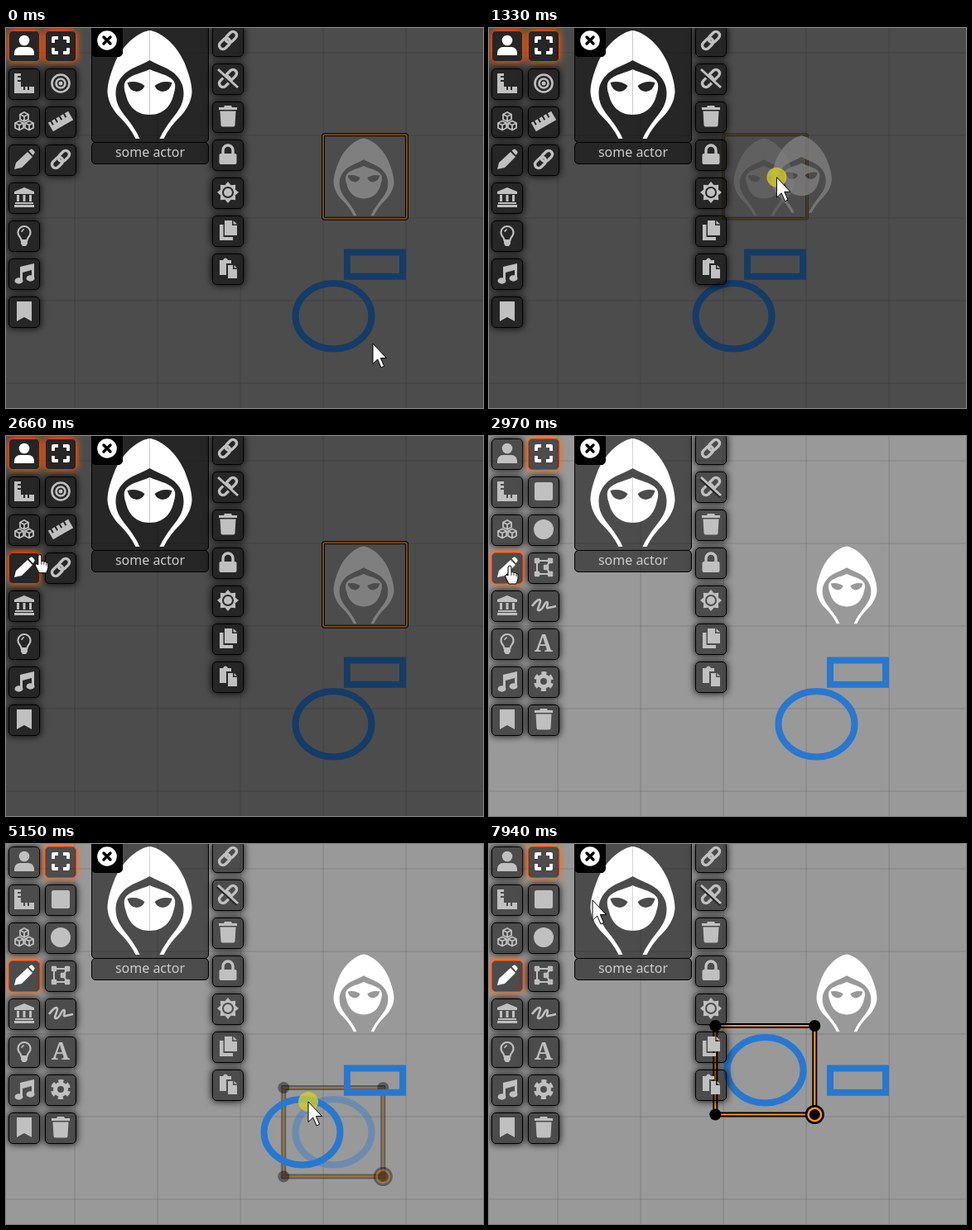
Recreate the animation shown at these times as an HTML page with a canvas. Size 576 px wide and 460 px high, loop 8000 ms.

```html
<!DOCTYPE html>
<html lang="en">
<head>
<meta charset="utf-8">
<title>Moving linked drawings</title>
<style>
  html, body { margin: 0; width: 576px; height: 460px; overflow: hidden; }
  body { position: relative; background: #999; }
  canvas, #pointer { position: absolute; left: 0; top: 0; }
  .box {
    position: absolute; box-sizing: border-box; border: 1px solid #000; border-radius: 5px;
    background: rgba(0, 0, 0, .5); color: #c0c0c0;
  }
  .tool { width: 38px; height: 38px; box-shadow: 0 0 10px #000; }
  .tool svg { display: block; fill: currentColor; fill-rule: evenodd; }
  .line { fill: none; stroke: currentColor; stroke-linejoin: round; }
  .on, .hover { color: #fff; border-color: #ff3000; box-shadow: 0 0 10px #ff6400; }
  #portrait { left: 103px; top: -8px; width: 142px; height: 147px; }
  #portrait svg { position: absolute; left: 0; top: 8px; fill: #fff; fill-rule: evenodd; }
  #name {
    left: 103px; top: 138px; width: 142px; height: 27px; color: #ccc;
    font: 500 16px/23px "Noto Sans", sans-serif; text-align: center;
  }
  #close { left: 103px; top: -3px; background: #000; color: #fff; box-shadow: none; }
</style>
</head>
<body>
<canvas id="scene" width="576" height="460"></canvas>
<div id="ui"></div>
<svg id="pointer" width="576" height="460">
  <g id="spot">
    <circle id="press" r="12" fill="#d8d028" fill-opacity=".76"/>
    <path id="arrow" d="M0 0V24.5L5.7 19 10 29 13.6 27.3 9.4 17.6H16.5Z" fill="#fff" stroke="#000"/>
    <g id="hand" fill="#fff" stroke="#000">
      <path d="M-2 12V2Q-2 0 0 0T2 2V8Q3.5 7 5 8.5 7 8 8 9.5 10 9 10 11V16L8 22H-1L-5 14Q-6 11-4 11Z"/>
      <path d="M2 8v4M5 9v3M8 10v3" fill="none" stroke-width=".8"/>
    </g>
  </g>
</svg>
<script>
const LOOP = 8000, SWITCH = 2890;
const $ = id => document.getElementById(id);
const ctx = $('scene').getContext('2d');

// Right half of the hooded figure, mirrored for the left
const HOOD = 'M0 0C11 1 31 14 42 39C47 52 51 63 51 75C50 88 43 98 36 105C28 113 22 121 17 131H12' +
  'C16 122 21 115 27 107C36 96 41 88 41 76C41 66 37 59 30 52C20 44 8 41 0 36Z' +
  'M0 47C8 51 21 53 28 60C32 64 31 71 29 77C26 91 17 102 0 102Z' +
  'M6 67Q15 60 27 63Q25 73 16 74Q9 74 6 67Z';
const hood = new Path2D(HOOD);
hood.addPath(new Path2D(HOOD), new DOMMatrix([-1, 0, 0, 1, 0, 0]));

const line = (d, w) => `<path class="line" stroke-width="${w}" d="${d}"/>`;
const fill = d => `<path d="${d}"/>`;
const disc = (r, x = 0, y = 0) => `<circle r="${r}" cx="${x}" cy="${y}"/>`;
const ring = (r, w, more = '') => `<circle class="line" r="${r}" stroke-width="${w}" ${more}/>`;
const cube = (x, y) => line(`M${x} ${y - 6}l5 2.5v6l-5 2.5-5-2.5v-6zM${x - 5} ${y - 3.5}l5 2.5 5-2.5M${x} ${y - 1}v6`, 1.8);
const star = 'M' + Array.from({ length: 16 }, (_, i) => {
  const r = i % 2 ? 9.5 : 13, a = i * Math.PI / 8;
  return (r * Math.cos(a)).toFixed(1) + ' ' + (r * Math.sin(a)).toFixed(1);
}).join('L') + 'Z';
const chain = `<g class="line" stroke-width="3.4" transform="rotate(-45)">
  <rect x="-13" y="-4.5" width="15" height="9" rx="4.5"/><rect x="-2" y="-4.5" width="15" height="9" rx="4.5"/></g>`;

const icons = {
  user: disc(6.3, 0, -6) + fill('M-12 12v-3a7 7 0 0 1 7-7h10a7 7 0 0 1 7 7v3z'),
  measure: fill('M-12-12h8v3h-4v2h4v3h-4v2h4v6h3v4h2v-4h3v4h2v-4h6v8h-24z'),
  cubes: cube(0, -5) + cube(-6, 5.5) + cube(6, 5.5),
  pencil: fill('M-12 12l2-8L4-9l6 6-13 13zM5.5-10.5l2-1.5q1.5-1 3 .5l1.5 1.5q1.5 1.5 0 3l-1.5 2z'),
  bank: fill('M0-12L12-7v3H-12v-3zM-9-3h3v8h-3zM-1.5-3h3v8h-3zM6-3h3v8h-3zM-11 6h22v2h-22zM-12 9h24v3h-24z'),
  bulb: line('M-3.5 6Q-4 3-6 1A7.5 7.5 0 1 1 6 1Q4 3 3.5 6Z', 2.2) + line('M-3-4q.5-3 3-3', 1.5) + fill('M-4 7h8v3l-2 3h-4l-2-3z'),
  music: fill('M-5-8L12-12V6h-3V-4L-2-1V9h-3z') +
    '<ellipse cx="-6.5" cy="9" rx="5" ry="3.7"/><ellipse cx="7.5" cy="6" rx="5" ry="3.7"/>',
  bookmark: fill('M-9-12h18v24l-9-5-9 5z'),
  expand: line('M-9-3V-9H-3M3-9H9V-3M9 3V9H3M-3 9H-9V3', 3.8),
  target: ring(10.5, 2.6) + ring(5.5, 2.6) + disc(2.5),
  ruler: '<g transform="rotate(-30)">' + fill('M-14-6h3v5h2v-5h4v5h2v-5h4v5h2v-5h4v5h2v-5h5v12h-28z') + '</g>',
  link: chain,
  square: '<rect x="-11" y="-11" width="22" height="22" rx="2.5"/>',
  circle: disc(12),
  polygon: line('M-8-8H8L3 0 8 8H-8Z', 2) +
    '<g class="line" stroke-width="2.4">' + [[-8, -8], [8, -8], [8, 8], [-8, 8], [3, 0]].map(([x, y]) =>
      `<rect x="${x - 2}" y="${y - 2}" width="4" height="4"/>`).join('') + '</g>',
  wave: line('M-14 1C-8-7-4-9-4-5S-10 7-5 6 1-5 4-4 1 5 6 3L15 1', 2.6),
  letter: '<text y="10" text-anchor="middle" font-family="Noto Serif, serif" font-weight="bold" font-size="29">A</text>',
  gear: ring(6.5, 5) + ring(10, 4, 'stroke-dasharray="6 4.472" transform="rotate(13)"'),
  trash: fill('M-11-11h6l1-2h8l1 2h6v3h-22zM-9.5-6.5h19l-1 17q0 2-2 2h-13q-2 0-2-2z'),
  unlink: chain + '<path d="M-13-9L11 13" stroke="#262626" stroke-width="3"/>' + line('M-12-11L12 11', 3),
  lock: line('M-6 0v-5a6 6 0 0 1 12 0v5', 3.4) + '<rect x="-10.5" y="-1" width="21" height="13" rx="2"/>',
  sun: fill(star + 'M-7 0a7 7 0 1 0 14 0a7 7 0 1 0-14 0') + disc(5),
  copy: fill('M-4-12h9v6h6v12h-15zM6.5-12l4.5 4.5h-4.5zM-10-7h4.5v15H6v4h-16z'),
  paste: fill('M-10-10h4q1-2.5 3-2.5t3 2.5h4v4h-6v14h-8zM0-4h6v5h5v11h-11zM7.5-4l3.5 3.5h-3.5z'),
  close: disc(11.8) + '<path d="M-4-4L4 4M4-4L-4 4" stroke="#000" stroke-width="3.4" stroke-linecap="round"/>'
};
const svg = name => `<svg width="36" height="36" viewBox="-18 -17 36 36">${icons[name]}</svg>`;

const tools = [];
function column(x, y, names, phase) {
  names.split(' ').forEach((name, i) => {
    const el = document.createElement('div');
    el.className = 'box tool';
    el.style.left = x + 'px';
    el.style.top = y + i * 46 + 'px';
    el.innerHTML = svg(name);
    $('ui').append(el);
    tools.push({ el, name, phase, x, y: y + i * 46 });
  });
}
const half = s => `<path transform="translate(69.5 2) scale(${s} 1)" d="${HOOD}"/>`;
$('ui').innerHTML = `<div class="box" id="portrait"><svg width="140" height="137">${half(1)}${half(-1)}</svg></div>
  <div class="box" id="name">some actor</div><div class="box tool" id="close">${svg('close')}</div>`;
column(3, 3, 'user measure cubes pencil bank bulb music bookmark');
column(47, 3, 'expand target ruler link', 'tokens');
column(47, 3, 'expand square circle polygon wave letter gear trash', 'drawings');
column(249, -3, 'link unlink trash lock sun copy paste');

// Pointer track: time, x, y
const track = [
  [0, 443, 382], [30, 443, 382], [230, 402, 184], [400, 402, 184], [780, 333, 184], [940, 302, 184],
  [1170, 302, 184], [1560, 412, 176], [1820, 412, 176], [1970, 190, 157], [2300, 105, 90],
  [2750, 25, 157], [2990, 25, 157], [3430, 358, 234], [3540, 358, 234], [4280, 403, 312],
  [4700, 403, 312], [5150, 365, 312], [5380, 365, 312], [5480, 358, 337], [5800, 358, 337],
  [6470, 360, 310], [6630, 360, 279], [6790, 358, 270], [7130, 358, 270], [7560, 414, 157],
  [7800, 414, 157], [7940, 125, 68], [LOOP, 125, 68]
];
const presses = [[390, 950], [1170, 1610], [4440, 4580], [4700, 5510], [5840, 7180]];
// Drags: start, end, grab x, grab y
const drags = [[400, 940, 402, 184], [1200, 1600, 302, 184], [4720, 5500, 403, 312], [6500, 6950, 358, 337]];

const within = (t, [a, b]) => t >= a && t < b;
const ramp = (t, a, d) => Math.min(1, Math.max(0, (t - a) / d));

function pointerAt(t) {
  const i = track.findIndex(k => k[0] > t);
  const [a, x, y] = track[i - 1], [b, u, v] = track[i];
  const k = (t - a) / (b - a);
  return [x + (u - x) * k, y + (v - y) * k];
}

function outline(path, black, orange) {
  for (const [w, c] of [[black, '#000'], [orange, '#ff9829']]) {
    ctx.lineWidth = w;
    ctx.strokeStyle = c;
    ctx.stroke(path);
  }
}

function token(x, y, alpha, framed) {
  ctx.globalAlpha = alpha;
  if (framed) {
    const p = new Path2D();
    p.roundRect(383 + x, 129.3 + y, 101, 101.4, 2);
    outline(p, 4, 2);
  }
  ctx.fillStyle = '#fff';
  ctx.save();
  ctx.translate(432 + x, 133.5 + y);
  ctx.scale(.715, .715);
  ctx.fill(hood, 'evenodd');
  ctx.restore();
  ctx.globalAlpha = 1;
}

function oval(x, y, alpha) {
  ctx.globalAlpha = alpha;
  ctx.lineWidth = 8;
  ctx.strokeStyle = '#2878d0';
  ctx.beginPath();
  ctx.ellipse(395.5 + x, 348.8 + y, 46, 39.7, 0, 0, 7);
  ctx.stroke();
  ctx.globalAlpha = 1;
}

function dot(x, y, r, color) {
  ctx.fillStyle = color;
  ctx.beginPath();
  ctx.arc(x, y, r, 0, 7);
  ctx.fill();
}

function handles(x, y, alpha) {
  const l = 335.3 + x, r = 455.3 + x, top = 295 + y, low = 402.5 + y;
  const p = new Path2D();
  p.rect(l, top, r - l, low - top);
  ctx.globalAlpha = alpha;
  outline(p, 6, 2.2);
  for (const [u, v] of [[l, top], [r, top], [l, low]]) dot(u, v, 7, '#000');
  dot(r, low, 11.5, '#000');
  dot(r, low, 9, '#ff9829');
  dot(r, low, 6.5, '#000');
  ctx.globalAlpha = 1;
}

function drawScene(t, px, py) {
  const dark = t < SWITCH;
  ctx.fillStyle = '#999';
  ctx.fillRect(0, 0, 576, 460);
  ctx.fillStyle = 'rgba(0,0,0,.13)';
  for (let i = 0; i < 5; i++) {
    ctx.fillRect(82.5 + i * 100, 0, 1.2, 460);
    ctx.fillRect(0, 29.4 + i * 100, 576, 1.2);
  }

  const drag = drags.find(d => within(t, d));
  const dx = drag ? px - drag[2] : 0, dy = drag ? py - drag[3] : 0;
  const shade = drag ? .4 : 1;
  const linked = within(t, [940, 1600]) ? -100 : 0;
  const ox = t < 5500 ? linked : -62;
  const oy = t < 5500 ? 0 : t < 6950 ? 25 : -75;

  oval(ox, oy, dark ? 1 : shade);
  if (t >= 4440) handles(ox, oy, shade);
  ctx.lineWidth = 8;
  ctx.strokeStyle = '#2878d0';
  ctx.strokeRect(412 + linked, 271.5, 67, 29.3);
  if (!dark && drag) oval(ox + dx, oy + dy, 1);

  const tx = -100 * (ramp(t, 940, 150) - ramp(t, 1600, 150));
  token(tx, 0, dark ? shade : 1, dark);
  if (dark && drag) token(tx + dx, dy, .8);

  if (dark) {
    ctx.fillStyle = 'rgba(0,0,0,.5)';
    ctx.fillRect(0, 0, 576, 460);
  }
}

function drawUi(t, px, py) {
  const phase = t < SWITCH ? 'tokens' : 'drawings';
  const left = within(t, [940, 1600]) ? 283 : 383;
  let hand = phase === 'tokens' && !drags.some(d => within(t, d)) &&
    px > left && px < left + 100 && py > 130 && py < 230;
  for (const b of tools) {
    const shown = !b.phase || b.phase === phase;
    const over = shown && px > b.x && px < b.x + 38 && py > b.y && py < b.y + 38;
    const on = b.name === 'expand' || b.name === (phase === 'tokens' ? 'user' : 'pencil');
    b.el.style.display = shown ? '' : 'none';
    b.el.classList.toggle('on', on);
    b.el.classList.toggle('hover', over);
    hand = hand || over;
  }
  $('spot').setAttribute('transform', `translate(${px} ${py})`);
  $('hand').style.display = hand ? '' : 'none';
  $('arrow').style.display = hand ? 'none' : '';
  $('press').style.display = presses.some(p => within(t, p)) ? '' : 'none';
}

const start = performance.now();
function frame() {
  const t = (performance.now() - start) % LOOP;
  const [x, y] = pointerAt(t);
  drawScene(t, x, y);
  drawUi(t, x, y);
  requestAnimationFrame(frame);
}
frame();
</script>
</body>
</html>
```
